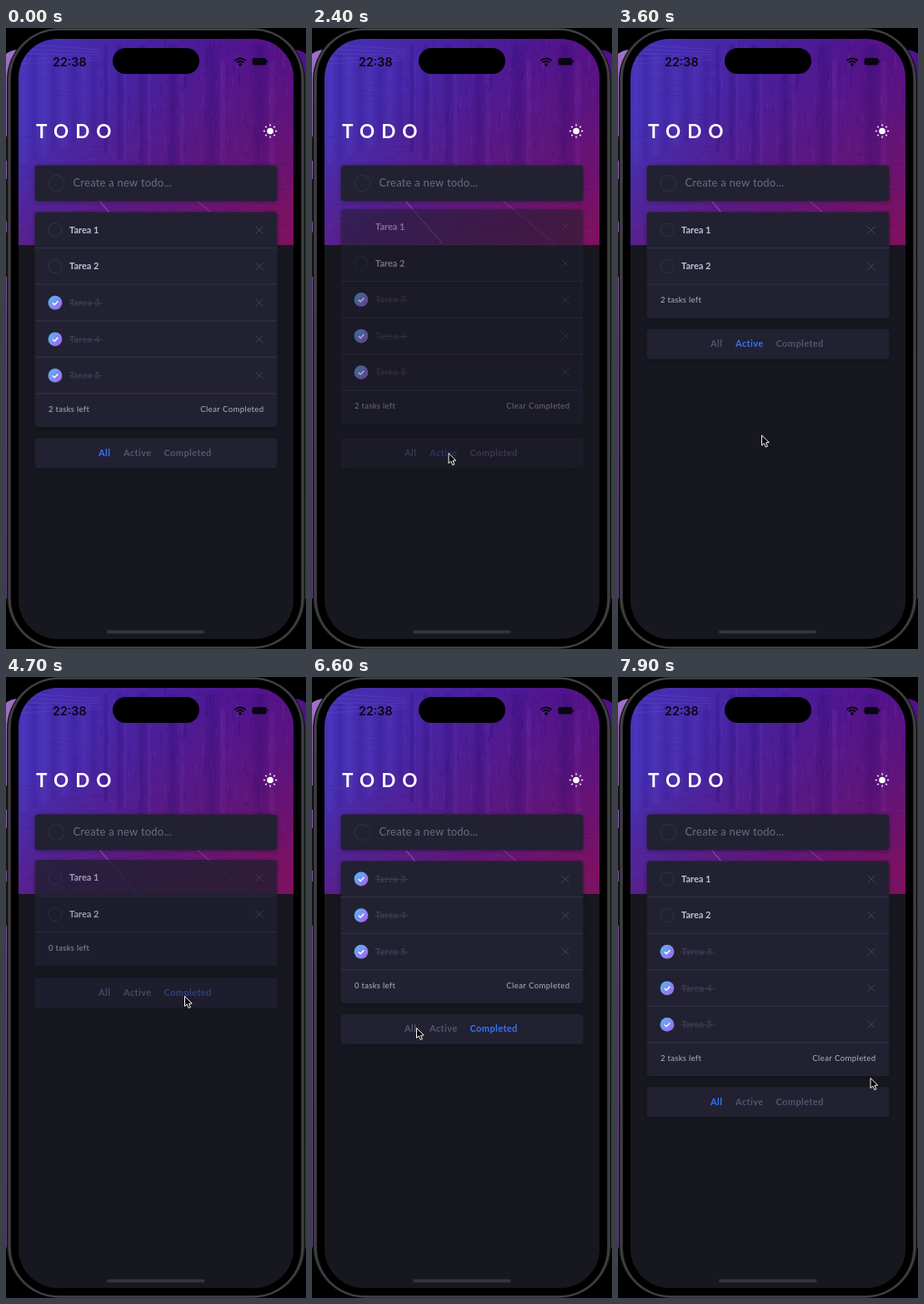
Animation of 360x744 px, one loop 8000 ms. Source, as an HTML page with a canvas:

```html
<!DOCTYPE html>
<html lang="es">
<head>
<meta charset="utf-8">
<title>Todo</title>
<style>
  html, body { margin: 0; width: 100%; height: 100%; overflow: hidden; background: #000; }
  canvas { display: block; width: 360px; height: 744px; }
</style>
</head>
<body>
<canvas id="stage"></canvas>
<script>
const W = 360, H = 744, LOOP = 8000;
const canvas = document.getElementById('stage');
const dpr = window.devicePixelRatio || 1;
canvas.width = W * dpr;
canvas.height = H * dpr;
const ctx = canvas.getContext('2d');

const FONT = 'Lato, "Open Sans", sans-serif';
const LEFT = 34.5, WIDTH = 291, LIST_TOP = 220.5, ROW = 43.6, FOOT = 39.5, GAP = 13.3;
const CARD = '#222132', LINE = '#343348', DIM = '#55546d', INK = '#08060f';
const BLUE = '#3a74f8', DARK_BLUE = '#2f4c9c';

const TASKS = [1, 2, 3, 4, 5].map(n => ({ name: 'Tarea ' + n, done: n > 2 }));
const FILTERS = {
  All: { rows: TASKS, left: 2, clear: true },
  Active: { rows: TASKS.filter(t => !t.done), left: 2, clear: false },
  Completed: { rows: TASKS.filter(t => t.done), left: 0, clear: true }
};
const TABS = [['All', 111], ['Active', 141], ['Completed', 189.5]];
const CLICKS = [
  { at: 2260, from: 'All', to: 'Active' },
  { at: 4635, from: 'Active', to: 'Completed' },
  { at: 6860, from: 'Completed', to: 'All' }
];
const OUT = 300, PAUSE = 40, IN = 250;

// Pointer path: time, x, y
const POINTER = [
  [1000, 330, 650], [1600, 163.5, 509], [3300, 163.5, 509], [4450, 214, 382],
  [4850, 214, 382], [5350, 220.5, 392], [5600, 220.5, 392], [6500, 125, 420],
  [7250, 125, 420], [7850, 302.5, 480], [LOOP, 302.5, 480]
];

const clamp = v => Math.max(0, Math.min(1, v));
const ease = v => v * v * (3 - 2 * v);

function seeded(seed) {
  return () => (seed = seed * 16807 % 2147483647) / 2147483647;
}

function roundBox(x, y, w, h, r, fill) {
  ctx.beginPath();
  ctx.roundRect(x, y, w, h, r);
  if (fill) {
    ctx.fillStyle = fill;
    ctx.fill();
  }
}

function disc(x, y, r, fill) {
  ctx.beginPath();
  ctx.arc(x, y, r, 0, 7);
  ctx.fillStyle = fill;
  ctx.fill();
}

function path(points, color, width) {
  ctx.beginPath();
  points.forEach(([x, y], i) => i ? ctx.lineTo(x, y) : ctx.moveTo(x, y));
  ctx.strokeStyle = color;
  ctx.lineWidth = width;
  ctx.stroke();
}

function ring(x, y, r) {
  ctx.beginPath();
  ctx.arc(x, y, r, 0, 7);
  ctx.strokeStyle = '#343347';
  ctx.lineWidth = 1;
  ctx.stroke();
}

function text(str, x, y, size, color, weight = 400, spacing = 0, family = FONT) {
  ctx.font = `${weight} ${size}px ${family}`;
  ctx.letterSpacing = spacing + 'px';
  ctx.fillStyle = color;
  ctx.fillText(str, x, y);
}

function linear(x0, y0, x1, y1, ...colors) {
  const g = ctx.createLinearGradient(x0, y0, x1, y1);
  colors.forEach((c, i) => g.addColorStop(i / (colors.length - 1), c));
  return g;
}

function panel(y, h) {
  ctx.save();
  ctx.shadowColor = 'rgba(0,0,0,.25)';
  ctx.shadowBlur = 6 * dpr;
  ctx.shadowOffsetY = dpr;
  roundBox(LEFT, y, WIDTH, h, 4, CARD);
  ctx.restore();
}

function drawBody() {
  ctx.fillStyle = '#000';
  ctx.fillRect(0, 0, W, H);
  roundBox(-8, 26, 188, 662, 22, linear(0, 26, 0, 688, '#a070c8', '#6f4496', '#5d3784'));
  roundBox(180, 26, 188, 662, 22, linear(0, 26, 0, 688, '#521090', '#482070', '#4a2872'));
  [[130, 29], [181, 51], [245, 53]].forEach(([y, h]) => roundBox(-2, y, 4, h, 1, '#111114'));
  roundBox(1, 0, 358, 744, 62, '#161617');
  roundBox(2.5, .5, 355, 743, 61, '#353537');
  ctx.strokeStyle = '#4c4c4f';
  ctx.lineWidth = 1;
  roundBox(3.5, 1.2, 353, 741.6, 60);
  ctx.stroke();
  roundBox(6, 3, 348, 738, 57, '#000');
}

function drawHero() {
  const random = seeded(71);
  ctx.save();
  ctx.beginPath();
  ctx.rect(15, 13, 330, 247);
  ctx.clip();
  ctx.fillStyle = linear(15, 0, 345, 0, '#4532b6', '#48209e', '#520e8c');
  ctx.fillRect(15, 13, 330, 247);
  ctx.fillStyle = linear(110, 70, 230, 290, 'rgba(90,24,128,0)', 'rgba(98,22,118,.65)', 'rgba(128,18,92,.9)');
  ctx.fillRect(15, 13, 330, 247);

  // Receding colonnade: narrow far columns, wide near ones
  for (let i = 0; i < 8; i++) {
    const x = 18 + i * 12;
    ctx.fillStyle = i % 2 ? 'rgba(40,20,130,.14)' : 'rgba(100,86,220,.12)';
    ctx.fillRect(x, 32, 7, 130 - i * 5);
  }
  for (let i = 0; i < 6; i++) {
    const x = 116 + i * 10 + i * i * 5, w = 7 + i * 3.5, bottom = 130 + i * 8;
    ctx.fillStyle = linear(x, 0, x + w, 0, 'rgba(36,8,105,0)', 'rgba(36,8,105,.26)', 'rgba(36,8,105,.05)');
    ctx.fillRect(x, 20, w, bottom);
    ctx.fillStyle = 'rgba(140,70,200,.1)';
    ctx.fillRect(x + w, 40, 2 + i, bottom - 20);
  }
  for (let i = 0; i < 5; i++) {
    path([[15, 19 + i * 6], [112, 26 + i * 3]], 'rgba(120,105,230,.16)', 1.5);
  }

  // Rough stone: short dashes, flatter and fainter on the ground
  for (let i = 0; i < 420; i++) {
    const x = 15 + random() * 330, y = 13 + random() * 247;
    const light = random() > .5, flat = y > 150 || x < 110;
    ctx.fillStyle = light ? 'rgba(150,100,220,.07)' : 'rgba(25,5,80,.1)';
    const length = 4 + random() * 14;
    ctx.fillRect(x, y, flat ? length : 2, flat ? 1.2 : length);
  }
  path([[112, 207], [157, 259]], 'rgba(175,120,205,.5)', 1.2);
  path([[229, 207], [293, 260]], 'rgba(165,85,180,.45)', 1.2);
  path([[15, 238], [110, 207]], 'rgba(135,80,190,.2)', 1);
  ctx.restore();
}

function drawStatus() {
  roundBox(128, 24, 104, 31, 15.5, '#000');
  text('22:38', 56, 45.5, 14.3, INK, 600, 0, 'Inter, sans-serif');
  ctx.strokeStyle = INK;
  ctx.lineWidth = 2;
  [8.6, 5.2].forEach(r => {
    ctx.beginPath();
    ctx.arc(281, 45, r, -Math.PI * .77, -Math.PI * .23);
    ctx.stroke();
  });
  disc(281, 43.8, 1.9, INK);
  roundBox(295.5, 36, 17, 8.5, 2.5, INK);
  roundBox(313.4, 38.7, 1.2, 3, .6, INK);
}

function drawHeader() {
  text('TODO', 36, 131.5, 22.5, '#fff', 700, 8);
  disc(317, 123.5, 3.8, '#fff');
  for (let i = 0; i < 8; i++) {
    const a = i * Math.PI / 4, c = Math.cos(a), s = Math.sin(a);
    path([[317 + c * 6, 123.5 + s * 6], [317 + c * 8.2, 123.5 + s * 8.2]], '#fff', 1.4);
  }
  panel(164.5, 43);
  ring(60.5, 186, 9.5);
  text('Create a new todo...', 80.5, 189.5, 13, '#6d6c84', 400, .22);
}

function drawRow(task, y) {
  if (task.done) {
    disc(59, y, 8.4, linear(52, y - 6, 66, y + 6, '#58b4f4', '#a466f0'));
    path([[55.8, y + .2], [58.2, y + 2.4], [62.4, y - 2]], '#fff', 1.5);
    text(task.name, 76, y + 3.8, 11, '#3c3b50', 700, .2);
    path([[75.5, y + .5], [116, y + .5]], '#3c3b50', 1);
  } else {
    ring(59, y, 8);
    text(task.name, 76, y + 3.8, 11, '#c0bfd6', 700);
  }
  path([[299.5, y - 4.5], [308.5, y + 4.5]], '#49485f', .9);
  path([[308.5, y - 4.5], [299.5, y + 4.5]], '#49485f', .9);
}

const listHeight = rows => rows.length * ROW + FOOT;

function drawList(view, left, alpha, dy) {
  if (alpha <= 0) return;
  ctx.save();
  ctx.globalAlpha = alpha;
  ctx.translate(0, dy);
  panel(LIST_TOP, listHeight(view.rows));
  view.rows.forEach((task, i) => {
    const y = LIST_TOP + i * ROW;
    drawRow(task, y + 21.5);
    path([[LEFT, y + ROW - .5], [LEFT + WIDTH, y + ROW - .5]], LINE, 1);
  });
  const base = LIST_TOP + view.rows.length * ROW + 21.3;
  text(left + ' tasks left', 51, base, 9.5, '#b3b2c8', 400, .3);
  if (view.clear) text('Clear Completed', 233.3, base, 9.5, '#b3b2c8', 400, .42);
  ctx.restore();
}

function drawTabs(view, active, alpha, highlight) {
  const y = LIST_TOP + listHeight(view.rows) + GAP;
  ctx.save();
  ctx.globalAlpha = alpha;
  panel(y, 36);
  TABS.forEach(([name, x]) =>
    text(name, x, y + 21.3, 11, name === active ? highlight : DIM, 700, .4));
  ctx.restore();
}

function drawContent(t) {
  const click = CLICKS.filter(c => t >= c.at).pop();
  if (!click) {
    drawList(FILTERS.All, 2, 1, 0);
    drawTabs(FILTERS.All, 'All', 1, BLUE);
    return;
  }
  const next = FILTERS[click.to], age = t - click.at;
  if (age < OUT) {
    const p = age / OUT, old = FILTERS[click.from];
    drawList(old, next.left, 1 - p, -10 * Math.pow(p, 1.3));
    drawTabs(old, click.to, 1 - p, DARK_BLUE);
  } else {
    const p = clamp((age - OUT - PAUSE) / IN);
    drawList(next, next.left, p, -5 * Math.pow(1 - p, 4));
    drawTabs(next, click.to, clamp((age - OUT) / PAUSE), BLUE);
  }
}

function drawPointer(t) {
  const i = POINTER.findIndex(k => t < k[0]);
  if (i < 1) return;
  const [t0, x0, y0] = POINTER[i - 1], [t1, x1, y1] = POINTER[i];
  const p = ease((t - t0) / (t1 - t0));
  ctx.save();
  ctx.translate(x0 + (x1 - x0) * p, y0 + (y1 - y0) * p);
  ctx.beginPath();
  [[.5, .5], [.5, 12.5], [3.3, 10], [5.3, 14.6], [7.4, 13.7], [5.5, 9.3], [9.2, 9.1]]
    .forEach(([x, y]) => ctx.lineTo(x, y));
  ctx.closePath();
  ctx.fillStyle = '#000';
  ctx.fill();
  ctx.strokeStyle = '#fff';
  ctx.lineWidth = 1;
  ctx.lineJoin = 'round';
  ctx.stroke();
  ctx.restore();
}

function draw(t) {
  ctx.setTransform(dpr, 0, 0, dpr, 0, 0);
  drawBody();
  ctx.save();
  roundBox(15, 13, 330, 719, 47);
  ctx.clip();
  ctx.fillStyle = '#171720';
  ctx.fillRect(15, 13, 330, 719);
  drawHero();
  drawStatus();
  drawHeader();
  drawContent(t);
  roundBox(121, 721.5, 117.5, 4, 2, '#34343c');
  ctx.restore();
  drawPointer(t);
}

function tick() {
  draw(performance.now() % LOOP);
  requestAnimationFrame(tick);
}
tick();
</script>
</body>
</html>
```
